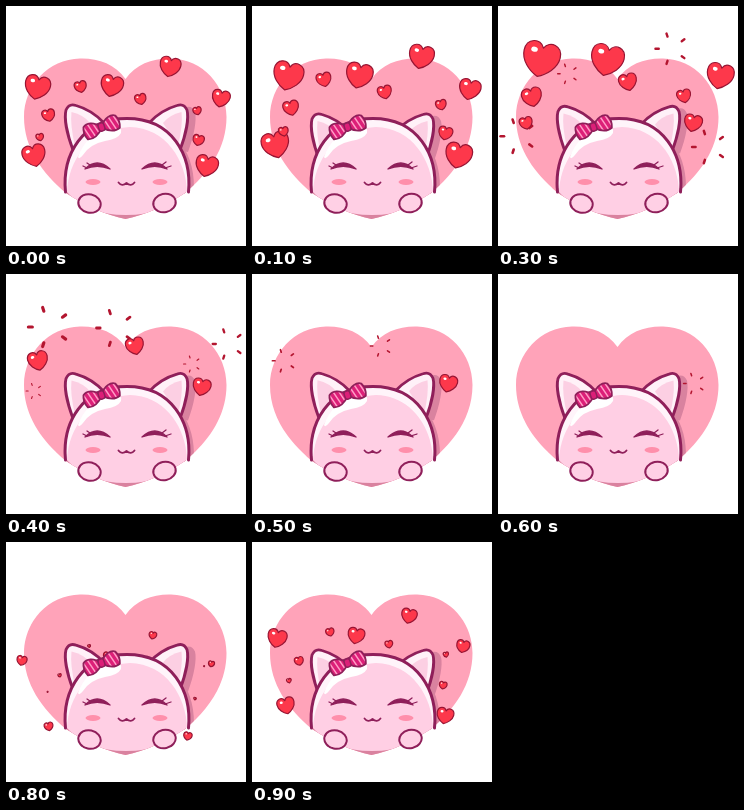
These frames come from a looping animation (240 px wide and 240 px high, 1000 ms). An HTML page:

```html
<!DOCTYPE html>
<html lang="en">
<head>
<meta charset="utf-8">
<title>Cat with hearts</title>
<style>
  html, body { margin: 0; height: 100%; overflow: hidden; background: #fff; }
  svg { display: block; width: 100vw; height: 100vh; }
  .line { fill: none; stroke: #8f1f5a; stroke-linecap: round; stroke-linejoin: round; }
  .shade { fill: #d9829f; }
</style>
</head>
<body>
<svg viewBox="0 0 240 240">
  <defs>
    <g id="heart">
      <path d="M0 .48C-.24 .38-.5 .14-.5-.14C-.5-.48-.12-.56 0-.3C.12-.56 .5-.48 .5-.14C.5 .14 .24 .38 0 .48Z"
        fill="#fd384b" stroke="#971433" stroke-width="1.2" stroke-linejoin="round" vector-effect="non-scaling-stroke"/>
      <ellipse cx="-.23" cy="-.22" rx=".09" ry=".07" fill="#fff"/>
    </g>
    <path id="earShape" d="M67 144C61 128 58 112 60 104Q63 97 70 99.500Q86 104 98 117L90 140Z"/>
    <g id="ear">
      <use href="#earShape" fill="#fff1f8"/>
      <path d="M69 140Q64 119 65.500 106Q78 109 84 117Z" fill="#fccfe3"/>
      <use href="#earShape" class="line" stroke-width="2.800"/>
    </g>
    <path id="skull" d="M59.500 186C56 149 76 112.500 121 112.500S186 149 182.500 186"/>
    <path id="bow" d="M0 0C-6-8-13-9-17-6Q-20 0-17 7C-12 9-6 7 0 1C6 7 12 9 17 7Q20 0 17-6C13-9 6-8 0 0Z"/>
    <path id="backdrop" d="M119.500 73C109 58 92 52 74 52.500C42 53 18 80 18 111C18 142 36 167 60 187C80 200 100 209 119.500 213C139 209 159 200 179 187C203 167 220.500 142 220.500 111C220.500 80 197 53 165 52.500C147 52 130 58 119.500 73Z"/>
    <clipPath id="inBow"><use href="#bow"/></clipPath>
    <clipPath id="inBackdrop"><use href="#backdrop"/></clipPath>
  </defs>

  <use href="#backdrop" fill="#ffa3b9"/>
  <g class="shade" clip-path="url(#inBackdrop)">
    <use href="#earShape" class="ear" transform="matrix(-1 0 0 1 249 2)"/>
    <use href="#skull" x="5" y="2"/>
    <path d="M58 184H188V214H58Z"/>
  </g>
  <g id="hearts"></g>

  <g class="ear"><use href="#ear"/><use href="#ear" transform="matrix(-1 0 0 1 241 0)"/></g>
  <use href="#skull" fill="#fff4fa"/>
  <path clip-path="url(#inBackdrop)" fill="#ffcfe4" d="M61 186C62 156 82 123 124 121C160 122 180 154 181 186Q160 209 120 209T61 186Z"/>
  <path d="M72 151Q80 129 102 121Q117 118 115 127Q112 133 99 135Q84 138 77 149Q73 154 72 151Z" fill="#fff"/>
  <use href="#skull" class="line" stroke-width="3"/>

  <g transform="translate(95.500 121) rotate(-20)">
    <use href="#bow" fill="#dc1f78"/>
    <path clip-path="url(#inBow)" stroke="#ff9dc6" stroke-width="1.500" d="M-18-10l5 20M-13-10l5 20M-8-10l5 20M4-10l5 20M9-10l5 20M14-10l5 20"/>
    <use href="#bow" class="line" stroke-width="1.800"/>
    <rect x="-3" y="-4" width="6" height="8" rx="2.500" fill="#dc1f78" stroke="#8f1f5a" stroke-width="1.500"/>
  </g>

  <g fill="#ff8fab">
    <ellipse cx="87" cy="176" rx="7.500" ry="2.900"/>
    <ellipse cx="154" cy="176" rx="7.500" ry="2.900"/>
  </g>
  <g class="line" stroke-width="1.300">
    <path fill="#8f1f5a" d="M79 163Q91 151 104 163Q91 157.500 79 163ZM136 163Q149 151 161 163Q149 157.500 136 163Z"/>
    <path d="M81 162l-4-2M84 159l-3-2M159 162l6-2M156 159l4-3"/>
    <path stroke-width="1.800" d="M112.500 176.500Q116 181 120.500 177Q125 181 128.500 176.500"/>
  </g>
  <g fill="#ffd0e5" stroke="#8f1f5a" stroke-width="2">
    <ellipse cx="83.500" cy="197.500" rx="11.300" ry="9.200" transform="rotate(12 83.500 197.500)"/>
    <ellipse cx="158.500" cy="197" rx="11.300" ry="9.200" transform="rotate(-12 158.500 197)"/>
  </g>
</svg>
<script>
const STEP = 100, STEPS = 10, RISE_STEPS = 4;

// One row per moment of bursting; each heart is [start x, end x, end y, size].
const waves = [
  [[78, 68, 63, 19], [34, 17, 123, 34], [157, 177, 36, 31], [193, 215, 134, 33]],
  [[25, 43, 53, 37], [104, 109, 54, 33], [211, 222, 70, 27], [37, 28, 117, 13], [194, 186, 90, 14]],
  [[47, 34, 91, 20], [137, 130, 76, 18]],
  [[191, 195, 117, 18]]
];
const hearts = waves.flatMap((wave, i) => wave.map(h => [...h, RISE_STEPS + i]));

const glide = u => Math.log(1 + 1.5 * u) / Math.log(2.5);
const mix = (a, b, u) => a + (b - a) * u;

function burst(x, y, size) {
  let marks = "";
  for (let a = -108; a < 252; a += 72)
    marks += `<path d="M${size * 0.45} 0h${1 + size * 0.08}" transform="translate(${x} ${y}) rotate(${a})"/>`;
  return `<g stroke="#b3152f" stroke-width="${size * 0.085}" stroke-linecap="round">${marks}</g>`;
}

function drawHeart([x0, x1, y1, full, life], age) {
  if (age > life) return "";
  const e = glide(Math.min(age, life - 1) / RISE_STEPS);
  const x = mix(x0, x1, e), y = mix(y1 + 10 + full * 0.9, y1, e);
  const size = mix(full * 0.6 - 3, full, Math.min(e, 1));
  if (age === life) return burst(x, y, size);
  const tilt = 13 * Math.sign(x1 - x0);
  return `<use href="#heart" transform="translate(${x} ${y}) rotate(${tilt}) scale(${Math.max(size, 1)})"/>`;
}

// Ears are up at the loop start, dip sharply on either side of it, then settle.
function earDrop(step) {
  const d = Math.min(step, STEPS - step);
  return d && 9 * 0.4 ** (d - 1);
}

let shown = -1;
function frame(now) {
  const step = Math.floor(now / STEP) % STEPS;
  if (step !== shown) {
    shown = step;
    const age = (step + 2) % STEPS - 1;
    document.getElementById("hearts").innerHTML = hearts.map(h => drawHeart(h, age)).join("");
    for (const ear of document.querySelectorAll(".ear"))
      ear.style.translate = `0 ${earDrop(step)}px`;
  }
  requestAnimationFrame(frame);
}
frame(performance.now());
</script>
</body>
</html>
```
